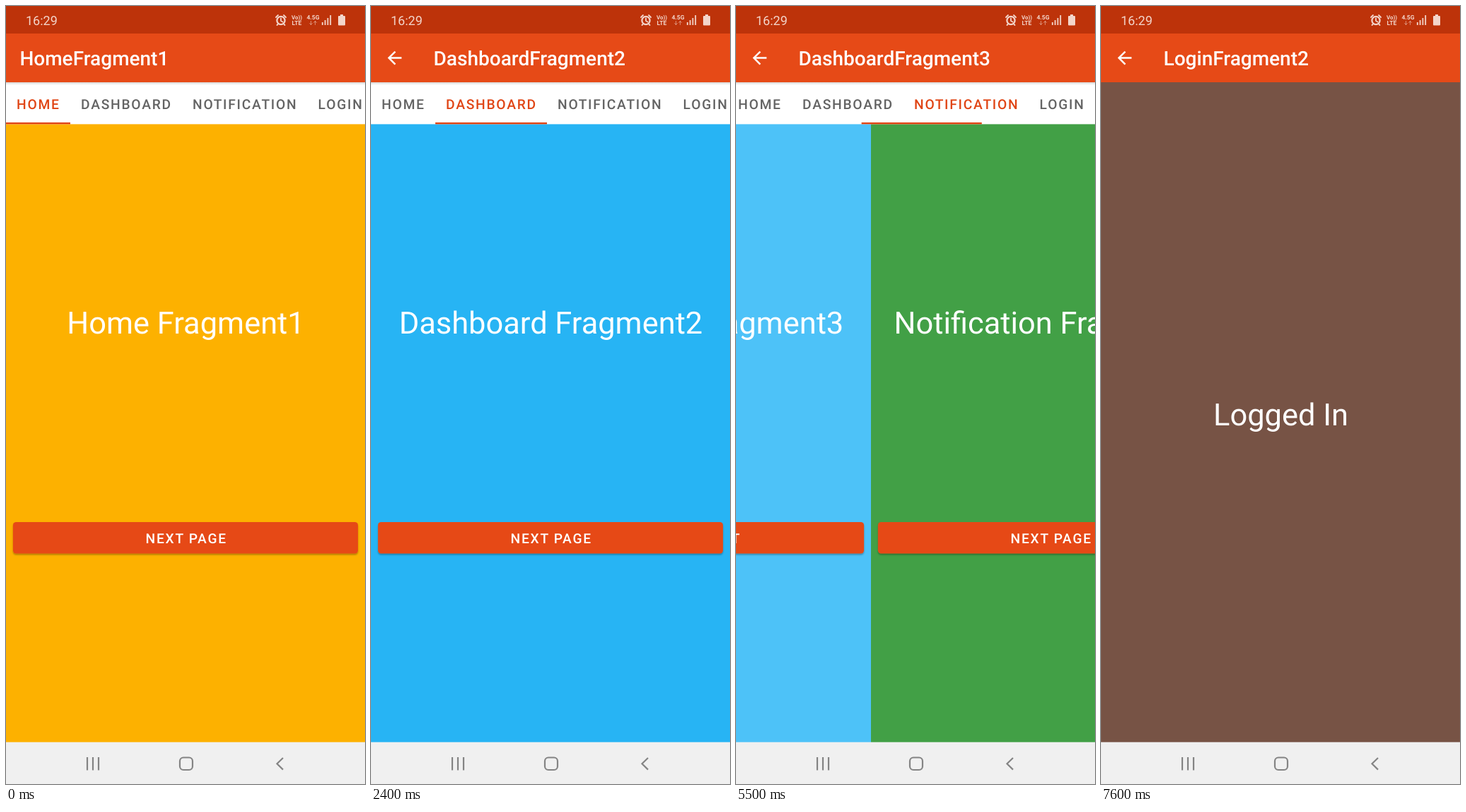
These frames come from a looping animation (508x1102 px, 8 s). An HTML page:

```html
<!DOCTYPE html>
<html lang="en">
<head>
<meta charset="utf-8">
<title>Tabbed navigation demo</title>
<style>
  html, body { margin: 0; width: 100%; height: 100%; overflow: hidden; }
  svg { display: block; width: 508px; height: 1102px; font-family: Roboto, sans-serif; text-rendering: geometricPrecision; }
  text { white-space: pre; }
  .title { font-size: 28px; font-weight: 500; fill: #fff; }
  .big { font-size: 43.4px; fill: #fff; text-anchor: middle; }
  .caps { font-size: 19.25px; font-weight: 500; letter-spacing: .0893em; }
  .label { fill: #fff; text-anchor: middle; }
  .tiny { font-weight: 700; text-anchor: middle; }
  .line { fill: none; stroke-linecap: round; stroke-linejoin: round; }
</style>
</head>
<body>
<svg viewBox="0 0 508 1102">
  <defs>
    <linearGradient id="shade" x2="0" y2="1">
      <stop stop-opacity=".16"/><stop offset="1" stop-opacity="0"/>
    </linearGradient>
    <filter id="drop" x="-5%" y="-20%" width="110%" height="150%">
      <feDropShadow dx="0" dy="1.8" stdDeviation="1.2" flood-opacity=".32"/>
    </filter>
  </defs>

  <g id="pager"></g>
  <g id="tabs">
    <rect y="108" width="508" height="59.4" fill="#fff"/>
    <g id="strip"></g>
    <rect id="indicator" y="164.9" height="2.5" fill="#e04515"/>
    <rect y="108" width="508" height="4" fill="url(#shade)"/>
  </g>
  <g id="loggedIn">
    <rect y="108" width="508" height="935" fill="#775345"/>
    <text class="big" x="254.5" y="594">Logged In</text>
  </g>

  <rect y="39" width="508" height="69" fill="#e64a17"/>
  <path id="arrow" fill="#fff" transform="translate(18.6 58.7) scale(1.235)"
    d="M20 11H7.83l5.59-5.59L12 4l-8 8 8 8 1.41-1.41L7.83 13H20z"/>
  <text id="title" class="title" y="84.3"></text>

  <rect width="508" height="39" fill="#bd330a"/>
  <g fill="#f3d5ca" stroke="#f3d5ca" stroke-width="0">
    <text x="28" y="27" font-size="18">16:29</text>
    <g class="line" stroke-width="2.3">
      <circle cx="389" cy="20.5" r="5.6"/>
      <path d="M389 17.5v3.5l2.5 1.5M382 16l3-3M396 16l-3-3M384.5 26l-1 1M393.5 26l1 1" stroke-width="1.8"/>
    </g>
    <text class="tiny" x="411.5" y="18.5" font-size="8">Vo))</text>
    <text class="tiny" x="411.5" y="27" font-size="8.5">LTE</text>
    <text class="tiny" x="434.5" y="19" font-size="8.5">4.5G</text>
    <path class="line" opacity=".55" stroke-width="1" d="M431.5 21.5v5l-2-2m2 2 2-2M437.5 26.5v-5l-2 2m2-2 2 2"/>
    <path d="M447.8 27v-4M451.6 27v-7M455.4 27v-10M459.2 27v-14" stroke-width="1.8"/>
    <path d="M473 12h4v2h2q1 0 1 1v11.500q0 1-1 1h-8q-1 0-1-1V15q0-1 1-1h2z"/>
  </g>

  <rect y="1042.7" width="508" height="59.3" fill="#f0f0f0"/>
  <g fill="none" stroke="#848484" stroke-width="2.2">
    <path d="M115 1064v18.500M123 1064v18.500M131 1064v18.500"/>
    <rect x="246" y="1064.500" width="18" height="17.500" rx="5"/>
    <path d="M392 1065l-8.500 8.300 8.500 8.300"/>
  </g>
</svg>
<script>
const WIDTH = 508, LOOP = 8000, STEP = 100;
const TABS = [
  { name: 'Home', left: 0, width: 91, colors: ['#fdb100', '#ffc926', '#ffd34d'] },
  { name: 'Dashboard', left: 91, width: 158, colors: ['#0299e6', '#27b4f4', '#4dc2f8'] },
  { name: 'Notification', left: 249, width: 177.5, colors: ['#42a046', '#65ba6b', '#80c684'] },
  { name: 'Login', left: 426.5, width: 93.5, colors: ['#6d4c41'] }
];
// [time, tab, page] of each navigation
const ROUTE = [
  [0, 0, 1], [600, 0, 2], [1100, 0, 3],
  [1900, 1, 1], [2400, 1, 2], [3000, 1, 1], [3800, 1, 2], [5100, 1, 3],
  [5800, 2, 1], [6300, 2, 2], [7600, 3, 2]
];
const SWIPES = [1582.2, 5416.5, 6640];
const TITLE_X = 19.4, TITLE_X_WITH_ARROW = 88.5;

const $ = id => document.getElementById(id);
const clamp = (v, lo = 0, hi = 1) => Math.min(hi, Math.max(lo, v));
const lerp = (a, b, u) => a + (b - a) * u;
const decelerate = u => 1 - (1 - u) ** 3;
const easeInOut = u => (1 - Math.cos(Math.PI * u)) / 2;

const buttonBox = 'x="9.9" y="731" width="488.2" height="44.5" rx="4.5"';
$('pager').innerHTML = TABS.map(() => `<g>
  <rect y="167" width="${WIDTH}" height="876"/>
  <text class="big" x="254.5" y="464"></text>
  <rect ${buttonBox} fill="#e64a17" filter="url(#drop)"/>
  <rect ${buttonBox} fill="#fff"/>
  <text class="caps label" x="255.2" y="761"></text></g>`).join('');
$('strip').innerHTML = TABS.map(tab =>
  `<text class="caps" x="${tab.left + 15.1}" y="145.8">${tab.name.toUpperCase()}</text>`).join('');

function drawPage(group, tab, page, x, pressed) {
  const [back, heading, , ripple, label] = group.children;
  group.setAttribute('transform', `translate(${Math.round(x)} 0)`);
  back.setAttribute('fill', tab.colors[page - 1]);
  heading.textContent = `${tab.name} Fragment${page}`;
  ripple.setAttribute('opacity', pressed ? .12 : 0);
  label.textContent = tab.name === 'Login' ? 'LOGIN' : page === 3 ? 'GO TO START' : 'NEXT PAGE';
}

function draw(t) {
  const done = ROUTE.filter(r => r[0] <= t);
  const [since, active, page] = done[done.length - 1];
  const next = ROUTE[done.length];
  const loggedIn = active === 3;
  const position = SWIPES.reduce((sum, start) => sum + decelerate(clamp((t - start) / 300)), 0);
  const nearest = Math.round(position);
  const pressed = next && next[2] > 1 && next[0] - t <= STEP;

  TABS.forEach((tab, i) => {
    const visited = done.filter(r => r[1] === i).pop();
    const current = visited && !loggedIn ? visited[2] : 1;
    drawPage($('pager').children[i], tab, current, (i - position) * WIDTH, pressed && i === nearest);
    $('strip').children[i].setAttribute('fill', i === nearest ? '#e04515' : '#636363');
  });

  const from = TABS[Math.floor(position)], to = TABS[Math.ceil(position)], u = position % 1;
  const scroll = clamp((position - 1) * 168 - 84, 0, 12);
  $('strip').setAttribute('transform', `translate(${-scroll} 0)`);
  $('indicator').setAttribute('x', lerp(from.left, to.left, u) - scroll);
  $('indicator').setAttribute('width', lerp(from.width, to.width, u));

  // The back arrow vanishes at once, then the title slides left.
  const slide = since ? easeInOut(clamp((t - since - 19) / 300)) : 1;
  $('arrow').style.display = page > 1 ? '' : 'none';
  $('title').setAttribute('x', lerp(TITLE_X_WITH_ARROW, TITLE_X, page > 1 ? 0 : slide));
  $('title').textContent = `${TABS[active].name}Fragment${page}`;

  $('loggedIn').style.display = loggedIn ? '' : 'none';
  $('tabs').style.display = $('pager').style.display = loggedIn ? 'none' : '';
}

const begin = performance.now();
function frame() {
  const t = (performance.now() - begin) % LOOP;
  draw(Math.floor(t / STEP) * STEP);
  requestAnimationFrame(frame);
}
frame();
</script>
</body>
</html>
```
